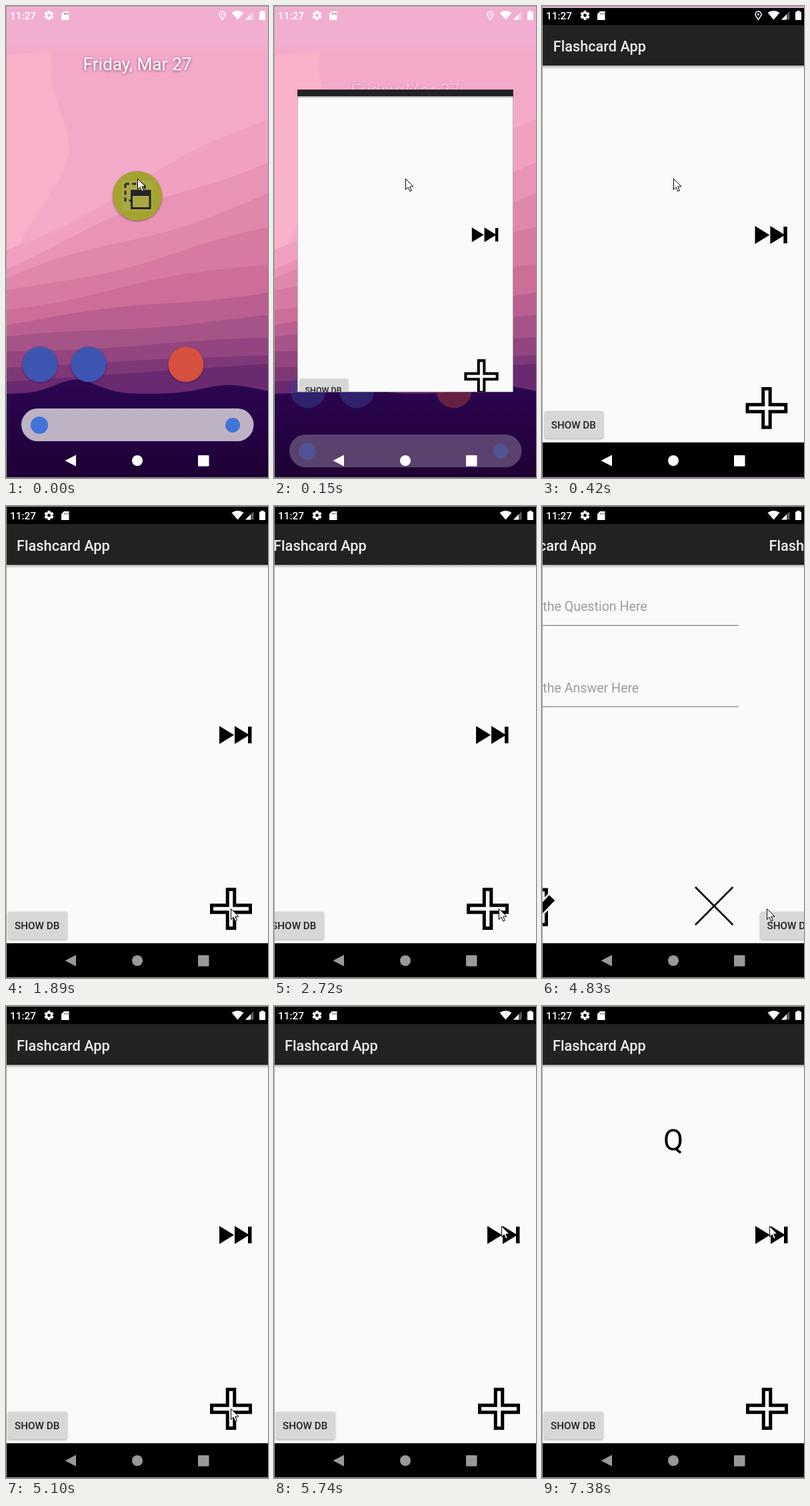
Recreate the animation shown at these times as an HTML page with a canvas. Size 393 by 706 pixels, loop 8000 ms.

```html
<!DOCTYPE html>
<html lang="en">
<head>
<meta charset="utf-8">
<title>Flashcard App</title>
<style>
html, body { margin: 0; width: 100%; height: 100%; overflow: hidden; background: #000; }
canvas { display: block; width: 393px; height: 706px; }
</style>
</head>
<body>
<canvas id="stage" width="393" height="706"></canvas>
<script>
const c = document.getElementById('stage').getContext('2d');
const W = 393, H = 706, LOOP = 8000, PAGE = 392, REFRESH = 133;

// The picture refreshes at a steady rate, counted from the start of each action.
const ACTION = { launch: 150, add: 2600, cancel: 4830, reach: 5470, next: 7110 };

const POINTER = [
  { at: 570, x: 197, y: 258 },
  { at: 945, x: 318, y: 574 },
  { at: 1080, x: 353, y: 601 },
  { at: 1870, x: 337, y: 602 },
  { at: 5220, x: 337, y: 602 },
  { at: 5736, x: 341, y: 329 }
];

const clamp = v => Math.max(0, Math.min(1, v));
const mix = (a, b, p) => a + (b - a) * p;
const span = (t, start, length) => clamp((t - start) / length);
const ease = p => (1 - Math.cos(Math.PI * p)) / 2;

function refreshTime(t) {
  const start = Object.values(ACTION).findLast(v => v <= t);
  return start === undefined ? 0 : start + Math.floor((t - start) / REFRESH) * REFRESH;
}

function rect(color, x, y, w, h, r = 0) {
  c.fillStyle = color;
  c.beginPath();
  c.roundRect(x, y, w, h, r);
  c.fill();
}

function disc(color, x, y, r) {
  c.fillStyle = color;
  c.beginPath();
  c.arc(x, y, r, 0, 2 * Math.PI);
  c.fill();
}

function poly(color, ...points) {
  c.fillStyle = color;
  c.beginPath();
  for (let i = 0; i < points.length; i += 2) c.lineTo(points[i], points[i + 1]);
  c.closePath();
  c.fill();
}

function line(color, width, x1, y1, x2, y2) {
  c.strokeStyle = color;
  c.lineWidth = width;
  c.beginPath();
  c.moveTo(x1, y1);
  c.lineTo(x2, y2);
  c.stroke();
}

function text(str, x, y, size, color, weight = 400, align = 'left') {
  c.font = `${weight} ${size}px Roboto, sans-serif`;
  c.textAlign = align;
  c.fillStyle = color;
  c.fillText(str, x, y);
}

function shadow(color, blur) {
  c.shadowColor = color;
  c.shadowBlur = blur;
  c.shadowOffsetY = 1;
}

const noShadow = () => shadow('transparent', 0);

function fade(y1, color1, y2, color2) {
  const g = c.createLinearGradient(0, y1, 0, y2);
  g.addColorStop(0, color1);
  g.addColorStop(1, color2);
  return g;
}

// Fills everything below y = height(x).
function hill(color, height) {
  c.fillStyle = color;
  c.beginPath();
  for (let x = 0; x <= W + 3; x += 3) c.lineTo(x, height(x));
  c.lineTo(W + 3, H);
  c.lineTo(0, H);
  c.fill();
}

function bandColor(p) {
  const light = [242, 160, 192], mid = [205, 109, 152], dark = [106, 42, 112];
  const rgb = light.map((v, i) => p < .45 ? mix(v, mid[i], p / .45) : mix(mid[i], dark[i], (p - .45) / .55));
  return `rgb(${rgb.map(Math.round)})`;
}

function wallpaper() {
  rect(fade(55, '#f2aed0', 70, '#f5a9c8'), 0, 0, W, H);
  c.fillStyle = '#f9b0c9';
  c.beginPath();
  c.moveTo(0, 72);
  c.lineTo(70, 68);
  c.bezierCurveTo(60, 130, 90, 160, 95, 212);
  c.bezierCurveTo(90, 270, 40, 300, 0, 400);
  c.fill();

  const bands = 10;
  for (let i = 0; i < bands; i++) {
    const p = i / (bands - 1);
    const left = mix(365, 562, p), right = 535 - 367 * Math.pow(1 - p, 1.5);
    hill(bandColor(p), x => mix(left, right, x / W) + 8 * (1 - p) * Math.sin(x / 60 + i * 1.7));
  }

  const peak = (x, at, width) => Math.exp(-(((x - at) / width) ** 2));
  hill(fade(560, '#2c0653', H, '#1e0034'), x => 580 - 21 * peak(x, 105, 45) - 13 * peak(x, 335, 55));
}

function appIcon() {
  shadow('rgba(60,20,40,.5)', 3);
  disc('#a4a32e', 197, 284, 37);
  noShadow();
  rect('#a9a843', 174, 261, 46, 46);
  c.strokeStyle = '#25252a';
  c.lineWidth = 3;
  c.setLineDash([6, 4.2]);
  c.strokeRect(179, 266, 29, 25);
  c.setLineDash([]);
  rect('#25252a', 187, 275, 30.5, 29);
  rect('#a9a843', 190, 284, 24.5, 17);
}

function launcher(drop, alpha) {
  c.save();
  c.translate(0, drop);
  c.globalAlpha = alpha;
  shadow('rgba(70,30,60,.7)', 4);
  text('Friday, Mar 27', 197, 96, 26.2, '#fff', 400, 'center');
  shadow('rgba(30,0,40,.5)', 3);
  disc('#3e55b4', 51, 536, 26.5);
  disc('#3e55b4', 124, 536, 26.5);
  disc('#d5503f', 270, 536, 26.5);
  noShadow();
  rect('#bdb3c4', 23, 602, 348.5, 49, 24.5);
  disc('#4273d8', 50, 627, 13);
  disc('#4273d8', 340, 627, 11);
  c.restore();
}

// Bars and empty background, wide enough for the scaled window.
function backdrop() {
  const x = -1, w = W + 4;
  rect('#000', x, 0, w, H);
  rect('#fafafa', x, 88, w, 566);
  rect(fade(88, 'rgba(0,0,0,.3)', 93, 'rgba(0,0,0,0)'), x, 88, w, 5);
  rect('#222', x, 27, w, 61);
}

function page(offset, body) {
  c.save();
  c.translate(offset, 0);
  text('Flashcard App', 16, 66.5, 21.8, '#eee', 500);
  body();
  c.restore();
}

function cross(color, x, y, arm, width) {
  line(color, width, x - arm, y, x + arm, y);
  line(color, width, x, y - arm, x, y + arm);
}

function cardScreen() {
  for (const x of [320, 343]) poly('#000', x, 329, x + 22, 342.5, x, 356);
  rect('#000', 363, 330, 5.5, 25);
  cross('#000', 337.5, 602.5, 31.5, 15.5);
  cross('#fafafa', 337.5, 602.5, 26.5, 5.5);
  shadow('rgba(0,0,0,.35)', 3);
  rect('#d6d7d7', 3, 607, 88.5, 41, 2);
  noShadow();
  text('SHOW DB', 13, 633, 15.26, '#212121', 500);
}

function field(hint, y) {
  text(hint, 25, y, 19.6, '#9c9c9c');
  rect('#838383', 25, y + 21, 344, 1.2);
}

function editScreen() {
  field('Enter the Question Here', 157);
  field('Enter the Answer Here', 278.5);

  c.strokeStyle = '#000';
  c.lineWidth = 5;
  c.strokeRect(34.5, 574, 46, 52);
  rect('#000', 52, 566, 11, 10, 3);
  poly('#000', 42, 573, 50, 570, 65, 570, 73, 573, 67, 581, 48, 581);
  disc('#fafafa', 57.5, 574, 2.3);
  rect('#000', 44, 610.5, 11, 4.5);
  line('#fafafa', 17, 68, 608, 92, 583);
  line('#000', 11.5, 69, 607, 89, 586);
  poly('#000', 60, 616, 63, 605, 71, 613);

  for (const d of [-28.2, 28.2]) line('#000', 2.6, 332.2 - d, 570, 332.2 + d, 626.5);
}

function gear(x, y) {
  c.save();
  c.translate(x, y);
  for (let i = 0; i < 6; i++) {
    rect('#fff', -2, -7, 4, 4, .5);
    c.rotate(Math.PI / 3);
  }
  c.strokeStyle = '#fff';
  c.lineWidth = 3;
  c.beginPath();
  c.arc(0, 0, 3.9, 0, 2 * Math.PI);
  c.stroke();
  c.restore();
}

function locationPin(x, y) {
  c.strokeStyle = '#fff';
  c.lineWidth = 1.5;
  c.beginPath();
  c.arc(x, y, 4.4, Math.PI * .85, Math.PI * .15);
  c.lineTo(x, y + 8);
  c.closePath();
  c.stroke();
  disc('#fff', x, y, 1.6);
}

function statusIcons(showPin) {
  const white = '#fff';
  text('11:27', 6, 20, 15.4, white, 500);
  gear(64.5, 14);
  poly(white, 87, 8, 94.5, 8, 94.5, 21, 83, 21, 83, 12);
  for (let i = 0; i < 3; i++) rect('#777', 87 + i * 2.6, 10, 1.2, 3);
  if (showPin) locationPin(324.5, 12.5);

  c.fillStyle = white;
  c.beginPath();
  c.moveTo(347.5, 20.5);
  c.lineTo(338.5, 10);
  c.quadraticCurveTo(347.5, 4, 356.5, 10);
  c.fill();
  const signal = (color, size) => poly(color, 359, 20.5, 359 + size, 20.5 - size, 359 + size, 20.5);
  signal('rgba(255,255,255,.35)', 12.5);
  signal(white, 8);
  rect(white, 382.5, 7, 4, 3);
  rect(white, 380, 8.5, 9, 12.5, 1);
}

function navIcons(level) {
  const color = `rgb(${level},${level},${level})`;
  poly(color, 88.5, 680, 105, 671.5, 105, 688.5);
  disc(color, 197, 680, 8);
  rect(color, 288, 672, 16.5, 16.5, 1);
}

function pointer(t) {
  const next = POINTER.findIndex(k => k.at > t);
  const to = POINTER.at(next), from = POINTER[Math.max(0, next < 0 ? POINTER.length - 1 : next - 1)];
  const p = to === from ? 0 : span(t, from.at, to.at - from.at);
  c.save();
  c.translate(Math.round(mix(from.x, to.x, p)) + .5, Math.round(mix(from.y, to.y, p)) + .5);
  poly('#fff', 0, 0, 0, 16, 3.7, 12.5, 6.3, 18.7, 8.8, 17.6, 6.3, 11.6, 11.5, 11.5);
  c.strokeStyle = '#000';
  c.lineWidth = 1;
  c.stroke();
  c.restore();
}

function home() {
  wallpaper();
  launcher(0, 1);
  appIcon();
}

function launch(t) {
  const p = 1 - Math.pow(1 - span(t, ACTION.launch, 340), 2.5);
  const scale = mix(.815, 1, p), top = mix(76, 0, p), bottom = mix(631, H, p);
  if (p < 1) {
    wallpaper();
    launcher(39, .36 * (1 - p));
  }
  c.save();
  c.translate(mix(36, 0, p), mix(63, 0, p));
  c.scale(scale, scale);
  c.beginPath();
  c.rect(-1, top, W + 4, bottom - top);
  c.clip();
  backdrop();
  page(0, cardScreen);
  c.restore();
}

function slide(p, from, to) {
  backdrop();
  if (p < 1) page(-PAGE * p, from);
  if (p > 0) page((PAGE + 8) * (1 - p), to);
}

function question(t) {
  const shift = PAGE * (1 - ease(span(t, ACTION.next - 118, 200)));
  text('Q', 197 + shift, 216, 43.6, '#000', 400, 'center');
}

function draw(t) {
  if (t < ACTION.launch) home();
  else if (t < ACTION.add) launch(t);
  else if (t < ACTION.cancel) slide(ease(span(t, ACTION.add - 40, 300)), cardScreen, editScreen);
  else slide(ease(span(t, ACTION.cancel - 55.8, 195)), editScreen, cardScreen);
  if (t >= ACTION.next) question(t);

  statusIcons(t < 680);
  navIcons(Math.round(mix(255, 153, span(t, 960, 690))));
  pointer(t);
  rect('#a6a6a6', 0, 0, 1, H);
  rect('#a6a6a6', 0, 0, W, 1);
  rect('#a6a6a6', 0, H - 1, W, 1);
}

const begin = performance.now();
function tick() {
  draw(refreshTime((performance.now() - begin) % LOOP));
  requestAnimationFrame(tick);
}
tick();
</script>
</body>
</html>
```
